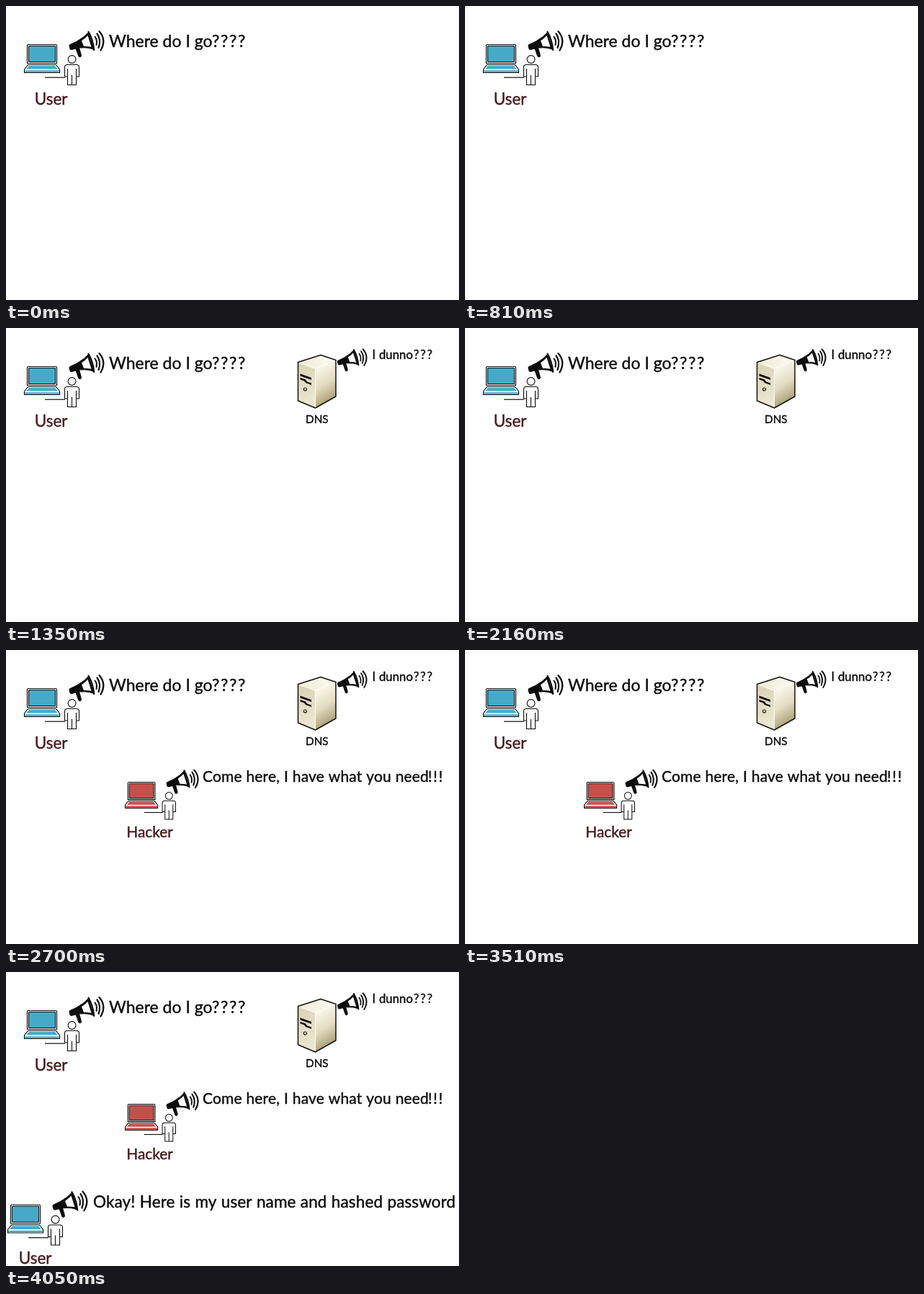
An HTML page with a canvas that plays this animation: 629 px wide and 408 px high, repeating every 5.4 s.

```html
<!DOCTYPE html>
<html lang="en">
<head>
<meta charset="utf-8">
<title>Name lookup spoofing</title>
<style>
  html, body { margin: 0; width: 100%; height: 100%; overflow: hidden; background: #fff; }
  canvas { display: block; width: 629px; height: 408px; }
</style>
</head>
<body>
<canvas id="stage"></canvas>
<script>
const W = 629, H = 408, STEP = 1350;
const INK = '#0c0c0c', MAROON = '#481a1c', TEAL = '#45aac8', RED = '#c4504c';
const canvas = document.getElementById('stage');
const ctx = canvas.getContext('2d');
const dpr = window.devicePixelRatio || 1;
canvas.width = W * dpr;
canvas.height = H * dpr;

// Filled text with a hairline outline for a slightly heavier weight
function text(str, x, y, size, color = INK, letter = 0, word = 0.4) {
  ctx.font = `${size}px Lato, Carlito, sans-serif`;
  ctx.letterSpacing = letter + 'px';
  ctx.wordSpacing = word + 'px';
  ctx.lineJoin = 'round';
  ctx.lineWidth = 0.4;
  ctx.fillStyle = ctx.strokeStyle = color;
  ctx.fillText(str, x, y);
  ctx.strokeText(str, x, y);
}

function shape(d, fill, stroke, width = 1) {
  const p = new Path2D(d);
  if (fill) { ctx.fillStyle = fill; ctx.fill(p); }
  if (stroke) { ctx.strokeStyle = stroke; ctx.lineWidth = width; ctx.stroke(p); }
}

function at(x, y, scale, draw) {
  ctx.save();
  ctx.translate(x, y);
  ctx.scale(scale, scale);
  draw();
  ctx.restore();
}

function gradient(x0, y0, x1, y1, ...colors) {
  const g = ctx.createLinearGradient(x0, y0, x1, y1);
  colors.forEach((c, i) => g.addColorStop(i / (colors.length - 1), c));
  return g;
}

// Megaphone, 50 by 38, top left at 0,0
function megaphone() {
  ctx.lineJoin = 'round';
  ctx.lineCap = 'round';
  shape('M9.5 25 L15 23.5 L18 34.5 Q18 37 15.8 37.3 Q13.8 37.3 13.2 35.5 Z', INK);
  shape('M0.5 21.5 Q0.2 19.8 2 19 L13.5 13.5 L17 24 L4 27 Q2 27 1.5 25.5 Z', INK);
  shape('M13 14 Q22 9 27.5 2.5 L35 26.5 Q27 23 17 24 Z', INK, INK, 1);
  shape('M18 14.2 Q23 11 26.5 7 L31.5 22.8 Q26 21.6 21 22 Z', '#fff');
  shape('M27.5 1.8 Q34 13 35.2 27', null, INK, 2.2);
  shape('M36.5 8.5 Q40 13 38.5 20', null, INK, 2);
  shape('M39.5 4.5 Q45.5 13 41.5 24', null, INK, 2.2);
  shape('M42.5 1.2 Q53 13 44.5 27.5', null, INK, 2.3);
}

function laptop(color) {
  ctx.lineJoin = 'round';
  shape('M31 53.5 H69 Q70.5 53.5 70.5 55 V79.5 H29.5 V55 Q29.5 53.5 31 53.5 Z', '#fff', INK, 1.2);
  shape('M31.5 55.5 H68.5 V77.5 H31.5 Z', color, INK, 1);
  shape('M30.5 81.5 H69.5 L74.5 88 V92.5 H25.5 V88 Z', '#fff', INK, 1.2);
  shape('M31.8 83 H68.2 L71.8 87.6 H28.2 Z', color);
  shape('M26.3 89.2 H73.7 V91.8 H26.3 Z', color);
}

function person() {
  ctx.lineCap = 'butt';
  shape('M54 99.2 H82', null, INK, 1.2);
  shape('M97 74 A5.4 5.4 0 1 1 86.2 74 A5.4 5.4 0 1 1 97 74 Z', '#fff', INK, 1.1);
  shape('M81.5 98 V85 Q81.5 81.5 85 81.5 H98 Q101.5 81.5 101.5 85 V98 H97.5 V109.5 H85.5 V98 Z', '#fff', INK, 1.1);
  shape('M85.5 87 V98 M97.5 87 V98 M91.5 96 V109.5', null, INK, 1.1);
}

function caller(x, y, scale, color) {
  at(x, y, scale, () => {
    ctx.translate(-26, -53);
    laptop(color);
    person();
    at(87, 34, 1, megaphone);
  });
}

function server() {
  ctx.lineJoin = 'round';
  shape('M405.5 47.5 L437 37.5 L458 44.5 L429.5 56.5 Z', gradient(408, 46, 456, 46, '#efebd8', '#fbfaf0'));
  shape('M405.5 47.5 L429.5 56.5 V111 L405.5 101 Z', gradient(405, 60, 430, 100, '#dcd5b9', '#ece7d2'));
  shape('M429.5 56.5 L458 44.5 V95 L429.5 111 Z', gradient(430, 55, 458, 100, '#fbf9ee', '#e2dbc0', '#a4976c'));
  shape('M405.5 47.5 L429.5 56.5 L458 44.5 M429.5 56.5 V111', null, '#fffdf2', 1);
  shape('M405.5 47.5 L437 37.5 L458 44.5 V95 L429.5 111 L405.5 101 Z', null, '#15130d', 1.5);
  shape('M408.5 63.5 L424 69 V72 L408.5 66.5 Z', INK);
  shape('M408.5 69 L416 71.6 L418 74.5 L424 76.6 V79 L416 76 L414 73.6 L408.5 71.6 Z', INK);
  shape('M417.4 85 A2 2 0 1 1 413.4 85 A2 2 0 1 1 417.4 85 Z', '#f4f0dc', INK, 1.1);
}

const scenes = [
  () => {
    caller(26, 53, 1, TEAL);
    text('Where do I go', 143, 57, 23, INK, 0, 0);
    text('????', 286, 57, 23, INK, 1.7);
    text('User', 39.7, 136.5, 22.5, MAROON);
  },
  () => {
    server();
    at(459.5, 28.5, 0.85, megaphone);
    text('I dunno', 508.5, 43, 16.8);
    text('???', 566, 43, 16.8, INK, 1.7);
    text('DNS', 416, 132, 15.3);
  },
  () => {
    caller(166, 183, 0.92, RED);
    text('Come here, I have what you need', 273, 182.7, 21, INK, 0.13);
    text('!!!', 586, 182.7, 21, INK, 1.7);
    text('Hacker', 167.3, 259.5, 20.9, MAROON);
  },
  () => {
    caller(3, 322.5, 1, TEAL);
    text('Okay! Here is my user name and hashed password', 121, 327, 22.6, INK, 0.08);
    text('User', 17.7, 404.5, 22.5, MAROON);
  }
];

const start = performance.now();

function draw() {
  const t = (performance.now() - start) % (STEP * scenes.length);
  ctx.setTransform(dpr, 0, 0, dpr, 0, 0);
  ctx.fillStyle = '#fff';
  ctx.fillRect(0, 0, W, H);
  scenes.slice(0, Math.floor(t / STEP) + 1).forEach(scene => scene());
  requestAnimationFrame(draw);
}
draw();
</script>
</body>
</html>
```
